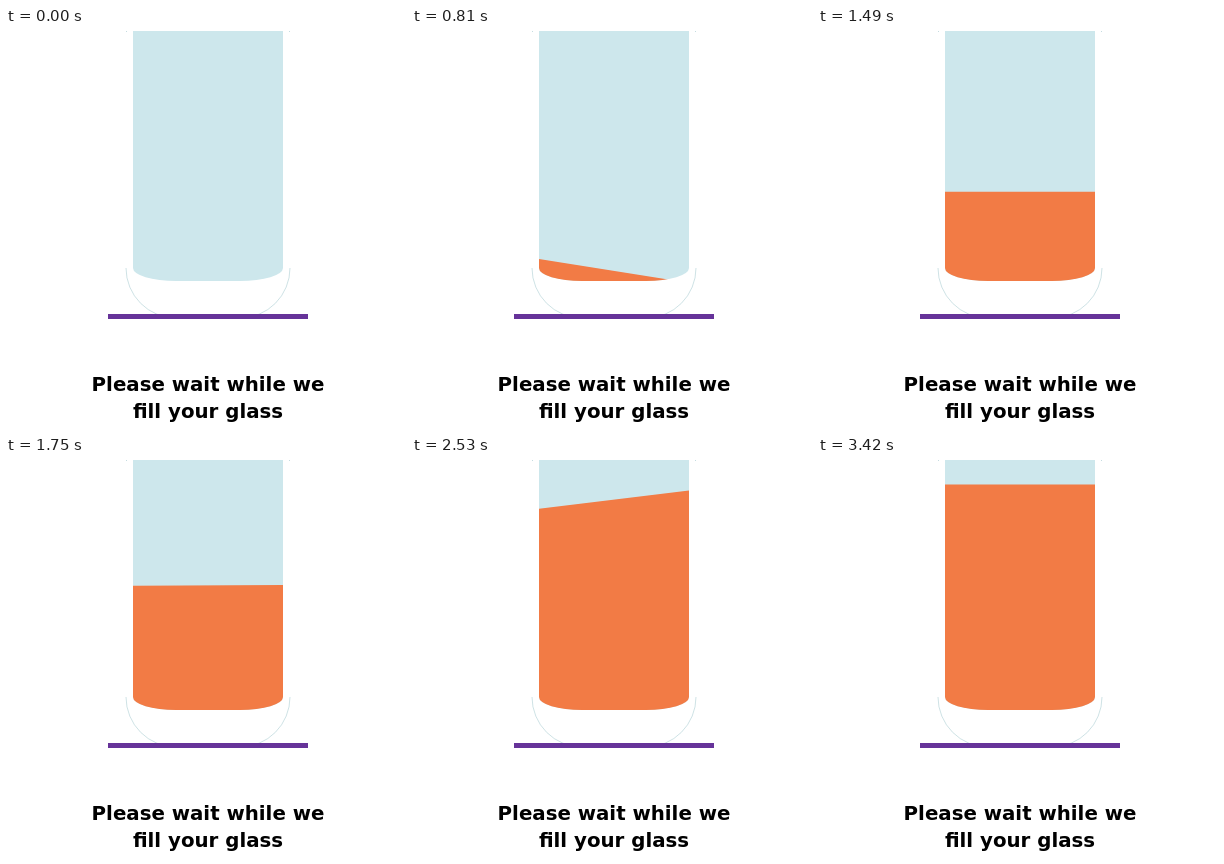
An HTML page with a canvas that plays this animation: 400 by 401 pixels, repeating every 3620 ms.

```html
<!DOCTYPE html>
<html lang="en">
<head>
<meta charset="utf-8">
<title>Filling glass</title>
<style>
  html, body { margin: 0; width: 100%; height: 100%; overflow: hidden; background: #fff; }
  canvas { display: block; }
</style>
</head>
<body>
<canvas id="stage" width="400" height="401"></canvas>
<script>
const ctx = document.getElementById('stage').getContext('2d');
const LOOP = 3620, STEP = 20;
const POUR = 290, STEADY = 1170, SLOW = 2190, FULL = 3420;
const LEFT = 127, RIGHT = 277, TOP = 3, CORNER = 240, MIDDLE = 202;
const EMPTY_Y = 254, STEADY_Y = 205.7, SLOW_Y = 67.3, FULL_Y = 27.5;

const progress = (t, from, to) => Math.min(1, Math.max(0, (t - from) / (to - from)));
const mix = (a, b, u) => a + (b - a) * u;
const easeInOut = u => (1 - Math.cos(Math.PI * u)) / 2;

// Rises from 0 to 1 at the peak and sinks back to 0.
const swell = (t, from, peak, to) =>
  easeInOut(progress(t, from, peak)) * easeInOut(1 - progress(t, peak, to));

// Surface height at the centre: speeds up, rises steadily, slows down.
function level(t) {
  if (t < STEADY) return mix(EMPTY_Y, STEADY_Y, progress(t, POUR, STEADY) ** 2.7);
  if (t < SLOW) return mix(STEADY_Y, SLOW_Y, progress(t, STEADY, SLOW));
  return mix(FULL_Y, SLOW_Y, (1 - progress(t, SLOW, FULL)) ** 3.1);
}

// How far the surface drops at the right wall and climbs at the left one.
const lean = t => 11.9 * swell(t, POUR, 780, 1400) - 9.4 * swell(t, 1650, 2420, FULL);

function glassInside() {
  ctx.beginPath();
  ctx.moveTo(LEFT, TOP);
  ctx.lineTo(RIGHT, TOP);
  ctx.lineTo(RIGHT, CORNER);
  ctx.ellipse(RIGHT - 43, CORNER, 43, 13, 0, 0, Math.PI / 2);
  ctx.ellipse(LEFT + 43, CORNER, 43, 13, 0, Math.PI / 2, Math.PI);
  ctx.closePath();
}

function rim() {
  ctx.strokeStyle = 'rgba(105, 165, 175, 0.55)';
  ctx.lineWidth = 0.6;
  ctx.beginPath();
  ctx.arc(LEFT + 43, CORNER, 50, Math.PI / 2, Math.PI);
  ctx.moveTo(RIGHT + 7, CORNER);
  ctx.arc(RIGHT - 43, CORNER, 50, 0, Math.PI / 2);
  ctx.stroke();
  ctx.fillStyle = '#c5dce0';
  ctx.fillRect(LEFT - 7, TOP, 1, 1);
  ctx.fillRect(RIGHT + 6, TOP, 1, 1);
}

function liquid(t) {
  const y = level(t), tilt = lean(t);
  ctx.fillStyle = '#f27b45';
  ctx.beginPath();
  ctx.moveTo(LEFT, y - tilt);
  ctx.lineTo(RIGHT, y + tilt);
  ctx.lineTo(RIGHT, 280);
  ctx.lineTo(LEFT, 280);
  ctx.fill();
}

function caption() {
  ctx.fillStyle = '#000';
  ctx.font = 'bold 19.8px "DejaVu Sans", sans-serif';
  ctx.textAlign = 'center';
  ctx.fillText('Please wait while we', MIDDLE, 363);
  ctx.fillText('fill your glass', MIDDLE, 390);
}

function draw(t) {
  ctx.fillStyle = '#fff';
  ctx.fillRect(0, 0, 400, 401);
  rim();

  ctx.save();
  glassInside();
  ctx.fillStyle = '#cde7ec';
  ctx.fill();
  ctx.clip();
  liquid(t);
  ctx.restore();

  ctx.fillStyle = '#663399';
  ctx.fillRect(102, 286, 200, 5);
  caption();
}

const start = performance.now();
function tick() {
  const t = (performance.now() - start) % LOOP;
  draw(Math.floor(t / STEP) * STEP);
  requestAnimationFrame(tick);
}
tick();
</script>
</body>
</html>
```
